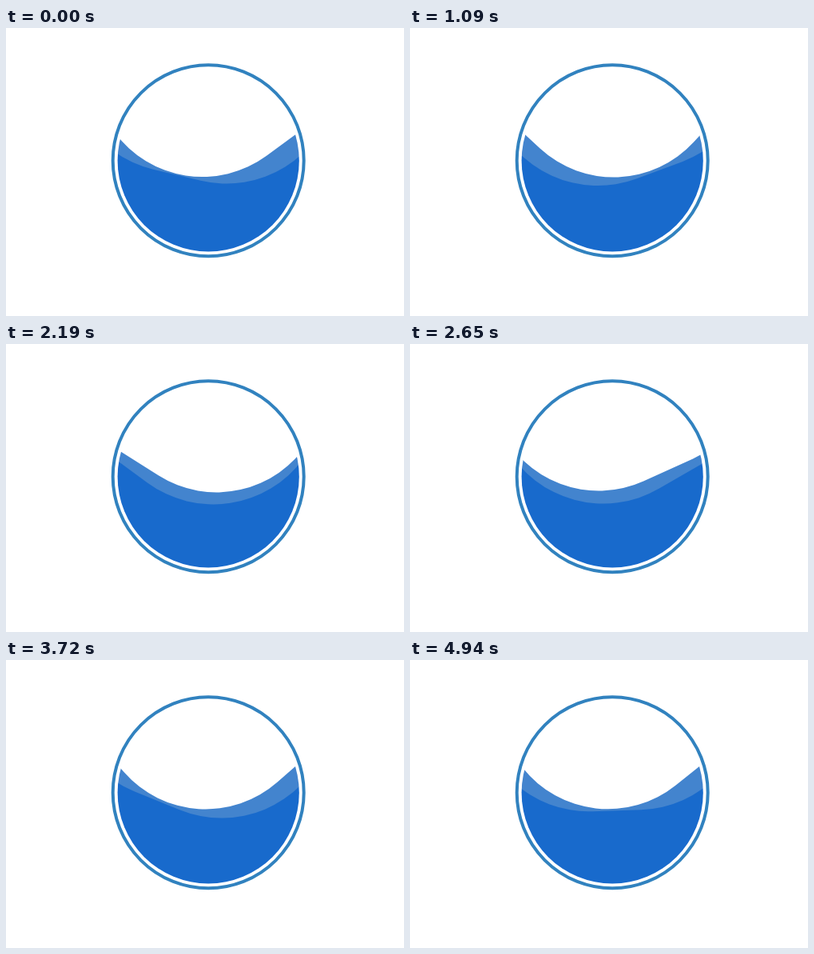
Write an HTML page with a canvas that moves like this. It is 498 px wide and 360 px high and loops after 5.02 s.

```html
<!DOCTYPE html>
<html lang="en">
<head>
<meta charset="utf-8">
<title>Water wave</title>
<style>
  html, body { margin: 0; width: 100%; height: 100%; overflow: hidden; background: #fff; }
  canvas { display: block; }
</style>
</head>
<body>
<canvas id="stage" width="498" height="360"></canvas>
<script>
const ctx = document.getElementById('stage').getContext('2d');
const LOOP = 5020;
const CENTER = { x: 253.2, y: 165.8 };

// Runs of evenly spaced pose changes: first time, last time, count.
const RUNS = [
  [0, 0, 1], [70, 560, 7], [630, 1090, 7], [1170, 1640, 7], [1700, 2190, 7],
  [2250, 2730, 7], [2800, 3260, 7], [3360, 3880, 8], [3950, 4420, 7], [4490, 4940, 7]
];
const STEPS = RUNS.flatMap(([from, to, count]) =>
  Array.from({ length: count }, (_, i) =>
    count > 1 ? Math.round((from + (to - from) * i / (count - 1)) / 10) * 10 : from));

// Rounded squares that turn above the water; angles in degrees, speed in degrees per ms.
const BACK = { y: 18.3, half: 170, radius: 139.4, start: 13.3, speed: 0.0516 };
const FRONT = { y: 2.5, half: 170, radius: 136, start: -36.2, speed: 0.0724 };

function disc(radius) {
  ctx.beginPath();
  ctx.arc(CENTER.x, CENTER.y, radius, 0, Math.PI * 2);
}

function fillSquare({ y, half, radius, start, speed }, time) {
  ctx.save();
  ctx.translate(253, y);
  ctx.rotate((start + speed * time) * Math.PI / 180);
  ctx.beginPath();
  ctx.roundRect(-half, -half, half * 2, half * 2, radius);
  ctx.fill();
  ctx.restore();
}

function draw(time) {
  ctx.globalCompositeOperation = 'source-over';
  ctx.clearRect(0, 0, 498, 360);

  ctx.fillStyle = '#186acc';
  disc(113.6);
  ctx.fill();

  ctx.globalCompositeOperation = 'source-atop';
  ctx.fillStyle = '#4384ce';
  fillSquare(BACK, time);

  ctx.globalCompositeOperation = 'destination-out';
  fillSquare(FRONT, time);

  ctx.globalCompositeOperation = 'source-over';
  ctx.strokeStyle = '#3182bf';
  ctx.lineWidth = 4;
  disc(119.5);
  ctx.stroke();
}

const origin = performance.now();

function tick() {
  const time = (performance.now() - origin) % LOOP;
  draw(STEPS.findLast(step => step <= time));
  requestAnimationFrame(tick);
}
tick();
</script>
</body>
</html>
```
